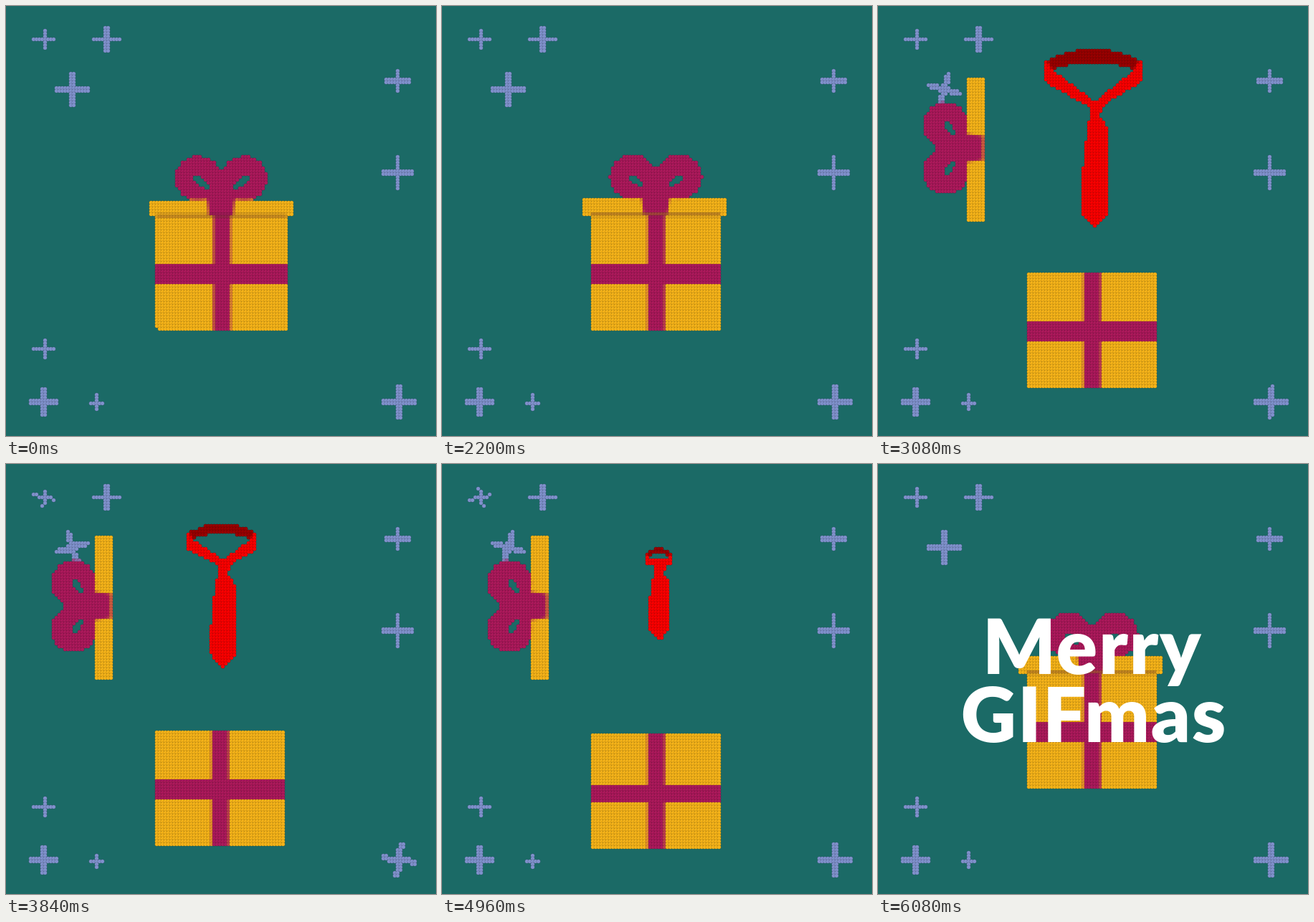
These frames come from a looping animation (600x600 px, 8 s). An HTML page with a canvas:

```html
<!DOCTYPE html>
<html lang="en">
<head>
<meta charset="utf-8">
<title>Merry GIFmas</title>
<style>
  html, body { margin: 0; width: 100%; height: 100%; overflow: hidden; background: #1b6a66; }
  canvas, svg { position: absolute; left: 0; top: 0; width: 100%; height: 100%; display: block; }
  text { font: 900 107px Lato, "Open Sans", sans-serif; letter-spacing: 1.7px; fill: #fff; text-anchor: middle; }
</style>
</head>
<body>
<canvas id="stage" width="600" height="600"></canvas>
<svg id="greeting" viewBox="0 0 600 600" visibility="hidden">
  <text x="299" y="293">Merry</text>
  <text x="301.5" y="388">GIFmas</text>
</svg>
<script>
const LOOP = 8000, STEP = 40, CELL = 4, GRID = 150;
const YELLOW = '#f6b41a', PINK = '#ad1a5c', BLUE = '#8092cd', RED = '#fa0000', DARK_RED = '#990000';
const BOX_W = 181.2, BOX_H = 159.5, BOX_Y = 291.2;

const stage = document.getElementById('stage').getContext('2d');
const greeting = document.getElementById('greeting');
const small = document.createElement('canvas');
small.width = small.height = GRID;
const art = small.getContext('2d', { willReadFrequently: true });

const easeInOut = u => u < 0.5 ? 2 * u * u : 1 - 2 * (1 - u) ** 2;

// Eased value at time t along [time, value] keys
function track(t, keys) {
  if (t <= keys[0][0]) return keys[0][1];
  for (let i = 1; i < keys.length; i++) {
    const [t0, a] = keys[i - 1], [t1, b] = keys[i];
    if (t < t1) return a + (b - a) * easeInOut((t - t0) / (t1 - t0));
  }
  return keys[keys.length - 1][1];
}

function rect(color, x, y, w, h) {
  art.fillStyle = color;
  art.fillRect(x, y, w, h);
}

function poly(color, points) {
  art.fillStyle = color;
  art.beginPath();
  points.forEach(p => art.lineTo(p[0], p[1]));
  art.fill();
}

// Rotates about a point while drawing
function turned(degrees, x, y, draw) {
  art.save();
  art.translate(x, y);
  art.rotate(degrees * Math.PI / 180);
  art.translate(-x, -y);
  draw();
  art.restore();
}

// Horizontal and vertical bars in cells, then the swing in degrees
const still = () => 0;
const stars = [
  { across: [9, 11, 8, 1], down: [13, 8, 1, 7],
    swing: t => t < 3080 ? 0 : 12 * Math.sin(2 * Math.PI * (t - 3080) / 2440) },
  { across: [30, 11, 10, 1], down: [34, 7, 2, 9], swing: still },
  { across: [17, 28, 12, 2], down: [22, 23, 2, 12],
    swing: t => 18 * Math.sin(3 * Math.PI * (t - 2400) / 3120) },
  { across: [132, 25, 9, 2], down: [136, 22, 1, 8], swing: still },
  { across: [131, 57, 11, 2], down: [136, 52, 1, 12], swing: still },
  { across: [9, 119, 8, 1], down: [13, 116, 1, 7], swing: still },
  { across: [8, 137, 10, 2], down: [12, 133, 2, 10], swing: still },
  { across: [29, 138, 5, 1], down: [31, 135, 1, 6],
    swing: t => 10 * Math.sin(3 * Math.PI * (t - 2400) / 3120) },
  { across: [131, 137, 12, 2], down: [136, 132, 2, 12],
    swing: t => track(t, [[2400, 0], [3200, 6], [4000, 7], [5000, -4], [5520, 0]]) }
];

function drawStars(t) {
  const moving = t > 2400 && t < 5520;
  for (const { across, down, swing } of stars) {
    const cx = (down[0] + down[2] / 2) * CELL, cy = (across[1] + across[3] / 2) * CELL;
    turned(moving ? swing(t) : 0, cx, cy, () => {
      for (const bar of [across, down]) rect(BLUE, ...bar.map(n => n * CELL));
    });
  }
}

// The tie tightens around its knot: half is half the collar's width
function drawTie(half, drop, clipY) {
  const lost = 69 - half, cx = 300 + lost * 0.04;
  const top = 60 + lost * 1.13, side = top + 4 + half * 0.19;
  const band = 3 + half * 0.22, inner = side + band * 0.6;
  const low = side + 8 + half * 0.28, tip = 308 - lost * 1.2;

  art.save();
  art.beginPath();
  art.rect(0, 0, 600, clipY);
  art.clip();
  art.translate(0, drop);

  art.fillStyle = DARK_RED;
  art.beginPath();
  art.moveTo(cx - half, side);
  art.quadraticCurveTo(cx, 2 * top - side, cx + half, side);
  art.lineTo(cx + half * 0.86, inner);
  art.quadraticCurveTo(cx, 2 * (top + band) - inner, cx - half * 0.86, inner);
  art.fill();

  for (const s of [-1, 1]) {
    poly(RED, [[cx + s * half, side], [cx + s * half * 0.92, side], [cx + s * half * 0.82, side + band * 0.7],
      [302, 134], [302 + s * 9, 139], [cx + s * half, low]]);
  }
  poly(RED, [[293, 132], [312, 132], [316, 138], [307, 150], [318, 168],
    [321 - lost * 0.08, tip - 80 + lost * 0.6], [321 - lost * 0.08, tip - 17], [302, tip],
    [283.5 + lost * 0.08, tip - 19], [283.5 + lost * 0.08, tip - 60 + lost * 0.4],
    [291.5, 172], [291.5, 166], [298, 150]]);
  art.restore();
}

function drawBox(x, y) {
  const snap = n => Math.round(n / CELL) * CELL;
  const beltTop = snap(y + 70), beltBottom = snap(y + 95.5);
  rect(YELLOW, x, y, BOX_W, BOX_H);
  art.globalCompositeOperation = 'source-atop';
  rect(PINK, x + 79.6, y - 4, 24, BOX_H + 8);
  rect(PINK, x - 4, beltTop, BOX_W + 8, beltBottom - beltTop);
  art.globalCompositeOperation = 'source-over';
}

function drawLid(x, y, degrees) {
  art.save();
  art.translate(x, y);
  art.rotate(degrees * Math.PI / 180);
  art.fillStyle = PINK;
  for (const s of [-1, 1]) {
    art.beginPath();
    art.ellipse(1 + s * 32.5, -42, 31.5, 31, 0, 0, 7);
    art.fill();
  }
  rect(YELLOW, -100, -10.75, 200, 21.5);
  poly(PINK, [[-16, -68], [2, -53], [18, -68], [21, -20], [18, 10], [-16, 10], [-19, -20]]);
  art.globalCompositeOperation = 'destination-out';
  for (const s of [-1, 1]) {
    poly('#000', [[39, -45], [31, -45], [16, -32], [16, -26], [24, -27], [38, -38]].map(p => [1 + s * p[0], p[1]]));
  }
  art.restore();
}

function drawClosed(lidX, lidY, boxX) {
  drawBox(boxX, BOX_Y);
  drawLid(lidX, lidY, 0);
  art.globalCompositeOperation = 'source-atop';
  rect('rgba(70,20,45,.42)', boxX, lidY + 9.2, BOX_W, 3.6);
  art.globalCompositeOperation = 'source-over';
}

function drawGift(t) {
  if (t < 2200) {
    const sway = track(t, [[1040, 0], [1180, -3], [1320, 1.2], [1440, -1], [1560, 0]]);
    turned(sway, 207, 240, () => drawClosed(298.9, 281.6, 209.8));
    return;
  }
  if (t < 2400 || t > 5500) {
    drawClosed(297, 280, 207.5);
    return;
  }
  const open = track(t, [[2400, 0], [3040, 1], [4960, 1], [5500, 0]]);
  const boxY = track(t, [[2400, BOX_Y], [2660, 285], [3040, 371.2], [4820, 371.2], [4980, 377], [5460, BOX_Y]]);
  const half = 69 - 0.0272 * Math.max(0, t - 3100);
  const drop = track(t, [[2480, 256], [3080, 0], [4960, 0], [5440, 250]]);
  const arc = (a, b, c) => (1 - open) ** 2 * a + 2 * open * (1 - open) * b + open ** 2 * c;
  drawTie(half, drop, boxY + 30);
  drawBox(207.5, boxY);
  drawLid(arc(297, 258, 136), arc(280, 180, 199.2), -90 * open);
}

// Turns every filled cell into a rimmed bead
function drawBeads() {
  const { data } = art.getImageData(0, 0, GRID, GRID);
  stage.clearRect(0, 0, 600, 600);
  stage.strokeStyle = 'rgba(0,0,0,.22)';
  stage.lineWidth = 0.6;
  for (let i = 0; i < GRID * GRID; i++) {
    const p = i * 4;
    if (data[p + 3] < 126) continue;
    stage.fillStyle = `rgb(${data[p]},${data[p + 1]},${data[p + 2]})`;
    stage.beginPath();
    stage.arc(i % GRID * CELL + 2.5, Math.floor(i / GRID) * CELL + 2.5, 2.75, 0, 7);
    stage.fill();
    stage.stroke();
  }
}

function render(t) {
  art.setTransform(1, 0, 0, 1, 0, 0);
  art.clearRect(0, 0, GRID, GRID);
  art.scale(1 / CELL, 1 / CELL);
  drawStars(t);
  drawGift(t);
  drawBeads();
  greeting.setAttribute('visibility', t >= 6080 ? 'visible' : 'hidden');
}

const start = performance.now();
let shown = -1;
function tick() {
  const t = Math.floor((performance.now() - start) % LOOP / STEP) * STEP;
  if (t !== shown) render(shown = t);
  requestAnimationFrame(tick);
}
tick();
</script>
</body>
</html>
```
